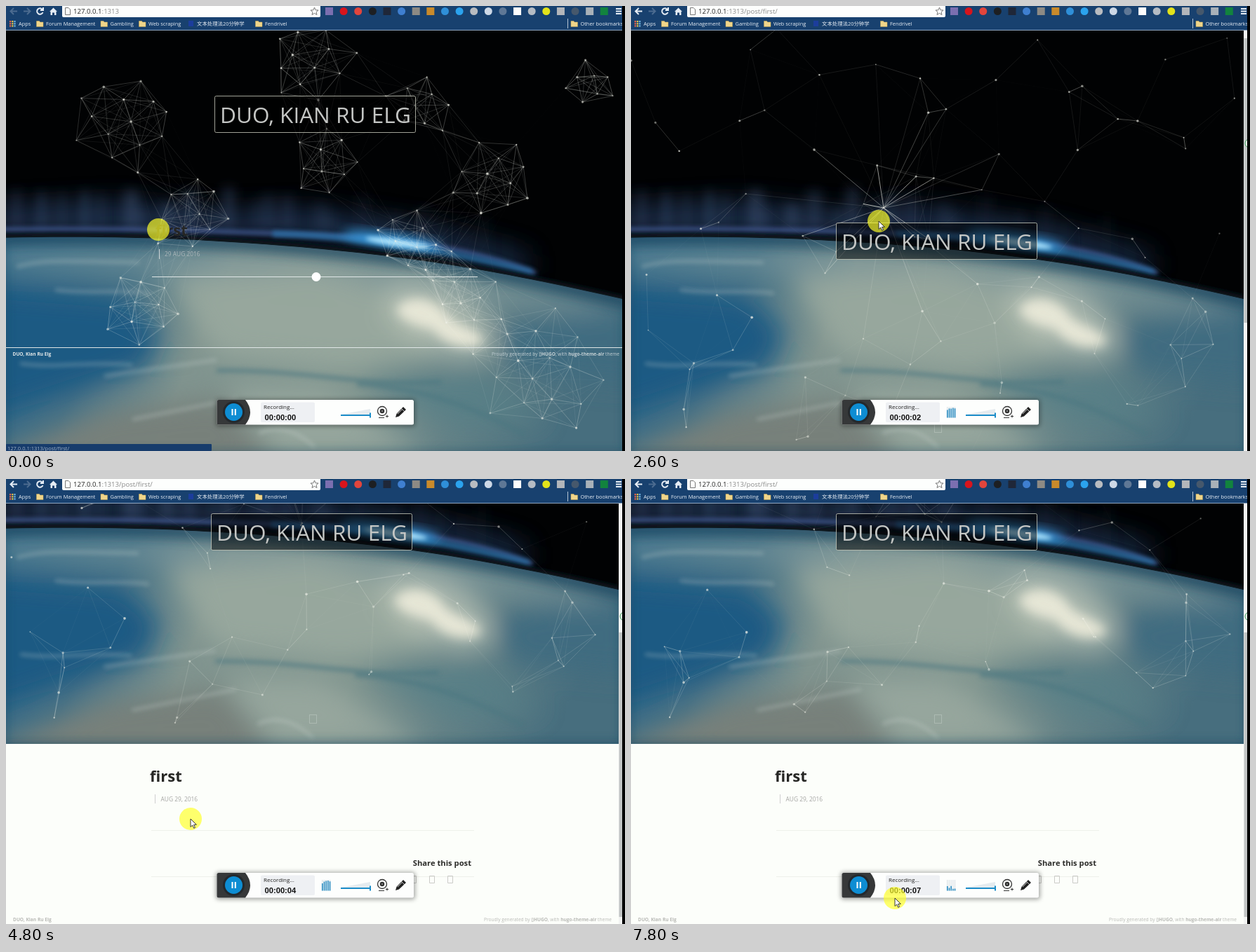
An HTML page with a canvas that plays this animation: 882x635 px, repeating every 8000 ms.

```html
<!DOCTYPE html>
<html lang="en">
<head>
<meta charset="utf-8">
<title>Air theme demo</title>
<style>
html, body { margin: 0; width: 100%; height: 100%; overflow: hidden; background: #000; }
#stage { position: relative; width: 882px; height: 635px; overflow: hidden; }
#stage > * { position: absolute; left: 0; top: 0; }
text { font-family: "Open Sans", "Noto Sans", sans-serif; }
.name { font-size: 31.5px; fill: #c4c6c4; }
.box { fill: #000; fill-opacity: .5; stroke: #c9cbbd; stroke-opacity: .8; }
.head { font-size: 22px; font-weight: 700; fill: #262624; }
.date { font-size: 8.4px; }
.foot { font-size: 6.6px; }
.b { font-weight: 700; }
.end { text-anchor: end; }
.mark { font-size: 7.4px; fill: #e9eff6; }
.url { font-size: 9.6px; fill: #8a8a8a; }
.arial { font-family: "Liberation Sans", Arial, sans-serif; }
</style>
</head>
<body>
<div id="stage">
<svg width="882" height="635">
  <defs>
    <filter id="soft" x="-50%" y="-50%" width="200%" height="200%"><feGaussianBlur stdDeviation="18"/></filter>
    <filter id="mid" x="-50%" y="-50%" width="200%" height="200%"><feGaussianBlur stdDeviation="8"/></filter>
    <filter id="fine" x="-20%" y="-50%" width="140%" height="200%"><feGaussianBlur stdDeviation="3"/></filter>
    <linearGradient id="land" x2="1" y2=".15">
      <stop offset="0" stop-color="#2a6587"/><stop offset=".22" stop-color="#437186"/>
      <stop offset=".38" stop-color="#80948f"/><stop offset=".65" stop-color="#80958f"/>
      <stop offset="1" stop-color="#476e7e"/>
    </linearGradient>
    <path id="globe" d="M-15 331C120 328 230 331 320 337C470 346 600 362 700 381C770 394 830 407 895 422V650H-15Z"/>
    <clipPath id="globeClip"><use href="#globe"/></clipPath>
  </defs>
  <g id="earth">
    <rect width="882" height="650" fill="#010203"/>
    <path d="M-20 290L160 280L300 295L430 290L600 315L745 355V385L600 350L400 328L-20 322Z" fill="#243a60" opacity=".75" filter="url(#soft)"/>
    <g id="rays" fill="#4a6288" filter="url(#mid)"/>
    <path d="M-10 319C200 317 350 322 480 329S700 358 755 382" fill="none" stroke="#4a62a0" stroke-width="6" opacity=".8" filter="url(#fine)"/>
    <path d="M380 325C470 326 590 340 750 380" fill="none" stroke="#2c78b0" stroke-width="9" opacity=".7" filter="url(#fine)"/>
    <ellipse cx="550" cy="335" rx="72" ry="9" transform="rotate(8 550 335)" fill="#38a0e6" filter="url(#mid)"/>
    <ellipse cx="558" cy="338" rx="46" ry="4.500" transform="rotate(8 558 338)" fill="#b4e8ff" filter="url(#fine)"/>
    <use href="#globe" y="-5" fill="#08121d" filter="url(#fine)"/>
    <g clip-path="url(#globeClip)">
      <use href="#globe" fill="url(#land)"/>
      <g filter="url(#soft)">
        <path d="M-20 340L330 345L620 375L900 435V450L600 410L200 382L-20 372Z" fill="#7f9a9f" opacity=".6"/>
        <path d="M-30 400L170 415L220 465L200 515L-30 590Z" fill="#1d5a83"/>
        <path d="M-30 645L140 578L310 560L390 660H-30Z" fill="#77807a"/>
        <path d="M230 390L440 375L560 410L610 500L480 520L300 500Z" fill="#9aa99f" opacity=".9"/>
        <path d="M690 455L900 430V540L730 525Z" fill="#416c80"/>
        <path d="M500 530L680 525L770 590L640 600Z" fill="#557f88" opacity=".8"/>
        <path d="M310 545L450 545L600 640H390Z" fill="#9caaa0" opacity=".8"/>
        <ellipse cx="620" cy="450" rx="85" ry="42" transform="rotate(25 620 450)" fill="#c3cabd" opacity=".7"/>
      </g>
      <path d="M556 432C570 412 610 410 632 446C660 462 690 470 676 484C645 492 620 478 608 462C590 458 560 450 556 432Z" fill="#e6e6d6" filter="url(#mid)"/>
      <g fill="none" stroke="#cfd8d3" stroke-width="4" opacity=".35" filter="url(#fine)">
        <path d="M15 372C60 360 90 365 190 366M70 405C120 412 160 404 205 410M20 510C70 518 120 506 180 512M140 528L300 505M180 590L330 560M360 610C390 595 420 610 440 630"/>
      </g>
      <path d="M300 520C420 518 520 545 620 536M500 540C600 545 670 575 740 612" fill="none" stroke="#4a7680" stroke-width="6" opacity=".6" filter="url(#fine)"/>
      <use href="#globe" fill="none" stroke="#1c4661" stroke-width="24" opacity=".75" filter="url(#mid)"/>
    </g>
  </g>
</svg>
<canvas width="882" height="635"></canvas>
<svg width="882" height="635">
  <g id="home">
    <rect class="box" x="297.5" y="128.5" width="286" height="52" rx="2"/>
    <text class="name" x="305" y="167">DUO, KIAN RU ELG</text>
    <text class="head" x="213" y="328">first</text>
    <path d="M218.5 347V361" stroke="#ccd3d6"/>
    <text class="date" x="226" y="357" fill="#aeb8bb">29 AUG 2016</text>
    <path d="M208 386.5H672M0 487.5H878" stroke="#dfe6e6"/>
    <circle cx="442" cy="386.5" r="6.5" fill="#fff"/>
    <g class="foot" fill="#c3cfd3">
      <text class="b" x="9.5" y="499" fill="#e3e8e8">DUO, Kian Ru Elg</text>
      <text class="end" x="874" y="499">Proudly generated by <tspan class="b">▯HUGO</tspan>, with <tspan class="b">hugo-theme-air</tspan> theme</text>
    </g>
    <rect y="625" width="293" height="10" rx="1" fill="#173c6c"/>
    <text x="2" y="633.5" font-size="7.5" fill="#9eb0c6">127.0.0.1:1313/post/first/</text>
  </g>
  <g id="post">
    <g id="sheet">
      <rect class="box" x="292.5" y="309.5" width="286" height="52" rx="2"/>
      <text class="name" x="300" y="348">DUO, KIAN RU ELG</text>
      <rect x="432.5" y="596.5" width="10" height="12" fill="none" stroke="#c8d2cc" opacity=".45"/>
      <rect y="638" width="873" height="262" fill="#fcfefa"/>
      <rect id="picked" x="205" y="668" width="44" height="32" fill="#cde5f7"/>
      <text class="head" x="205" y="692">first</text>
      <path d="M212.5 710V723" stroke="#cfcfcf"/>
      <text class="date" x="220.5" y="719.5" fill="#a5a5a3">AUG 29, 2016</text>
      <path d="M207 761.5H667M207 827.5H667" stroke="#eef1ea"/>
      <text class="b end" x="663" y="812" font-size="11.2" fill="#2c2c2a">Share this post</text>
      <path d="M577.5 826.5h7v10h-7zm26 0h7v10h-7zm26 0h7v10h-7z" fill="none" stroke="#cbcbc8"/>
      <g class="foot" fill="#b9bab6">
        <text class="b" x="10" y="891">DUO, Kian Ru Elg</text>
        <text class="end" x="863" y="891">Proudly generated by <tspan class="b">▯HUGO</tspan>, with <tspan class="b">hugo-theme-air</tspan> theme</text>
      </g>
    </g>
    <rect x="873" y="35" width="5" height="600" fill="#f3f4f3"/>
    <rect id="thumb" x="873.5" width="4.5" height="406" fill="#c2c5c5"/>
    <circle cx="881" cy="196" r="6" fill="#e8f4ea" stroke="#3b9a57"/>
  </g>
  <g id="chrome">
    <rect width="878" height="35" fill="#18416f"/>
    <path d="M0 34.5H878" stroke="#8ea5bf"/>
    <rect x="80" y="-3" width="368" height="19" rx="2" fill="#fdfefd"/>
    <g fill="none" stroke="#e6edf5" stroke-width="2">
      <path id="back" d="M16 7.5H7M11 3L6.5 7.5L11 12"/>
      <path d="M25 7.5H34M30 3L34.5 7.5L30 12" opacity=".25"/>
      <path d="M52 5A4.3 4.3 0 1 0 52.5 9M53 2V6H49"/>
    </g>
    <path d="M62 8L67.5 2.5L73 8H71.5V13H69V9.5H66V13H63.5V8Z" fill="#e6edf5"/>
    <path d="M84.5 2.5H89L91.5 5V12.5H84.5Z" fill="none" stroke="#777"/>
    <text class="url" x="96" y="11"><tspan fill="#222">127.0.0.1</tspan>:1313<tspan id="path">/post/first/</tspan></text>
    <path d="M439.5 2L441.1 5.8L445 6L442 8.7L443 12.5L439.5 10.4L436 12.5L437 8.7L434 6L437.9 5.8Z" fill="none" stroke="#777"/>
    <path d="M869 4H877M869 7.5H877M869 11H877" stroke="#e6edf5" stroke-width="1.8"/>
    <path d="M800.5 18V32" stroke="#b5c4d5"/>
    <text class="mark" x="18" y="28">Apps</text>
    <rect x="260" y="21" width="7" height="8" fill="#1c3d9c"/>
    <text class="mark" x="272" y="28">文本处理法20分钟学</text>
  </g>
  <rect x="878" width="4" height="635" fill="#000"/>
  <g id="recorder">
    <rect x="299" y="561" width="284" height="39" rx="4" fill="#000" opacity=".35" filter="url(#fine)"/>
    <rect x="300.5" y="562" width="280.5" height="35.5" rx="2.5" fill="#fdfefd"/>
    <path d="M303 562H341Q355 579.5 341 597.5H303Q300.5 597.5 300.5 595V564.5Q300.5 562 303 562Z" fill="#363839"/>
    <circle cx="324.5" cy="579.5" r="15.5" fill="#24292d"/>
    <circle cx="324.5" cy="579.5" r="12.5" fill="#0e8dd3"/>
    <path d="M322.5 575V584M326.8 575V584" stroke="#fff" stroke-width="2"/>
    <rect x="363" y="565.5" width="77" height="28.5" rx="2" fill="#eef0f3"/>
    <text x="367" y="574.5" font-size="8" fill="#222">Recording...</text>
    <text id="clock" class="arial b" x="368.5" y="590.5" font-size="11.2" fill="#111"></text>
    <g id="bars"></g>
    <path d="M477 583L519 575V583Z" fill="#e5ebef"/>
    <path d="M477 584H520M519 580.5V587.5" stroke="#1b8cc8" stroke-width="2"/>
    <g fill="none" stroke="#333">
      <circle cx="536" cy="578" r="6.5" stroke-width="1.3"/><circle cx="536" cy="578" r="2" stroke-width="2.5"/>
      <path d="M531 587.5H539M541 585.5H545M543 583.5V587.5"/>
    </g>
    <path d="M555 587L556.5 582L566 572L570 576L560 585.5Z" fill="#222"/>
    <path d="M563 574L568 579M558 582L565 575" stroke="#eee" stroke-width=".8"/>
  </g>
  <g id="pointer">
    <circle r="16" fill="#ffff28" opacity=".68"/>
    <path id="arrow" d="M0 0V11.5L2.7 9L4.7 13.3L6.5 12.4L4.6 8.3H8.3Z" fill="#fff" stroke="#222" stroke-width=".9"/>
    <path id="hand" d="M2 1Q3.5-1 4.7 1V6L10 7.5V11L8.5 15H3L0 10Q-1.5 7 2 8.5Z" fill="#fff" stroke="#222" stroke-width=".9"/>
  </g>
</svg>
</div>
<script>
const LOOP = 8000, STEP = 200, OPEN_POST = 1400, LINK = 112, GRAB = 225, SCROLL = 260;
const $ = id => document.getElementById(id);
const ctx = document.querySelector('canvas').getContext('2d');
const rand = n => { const s = Math.sin(n * 127.1 + 3) * 43758.5453; return s - Math.floor(s); };
const spread = n => rand(n) - .5;
const ease = x => { x = Math.min(1, Math.max(0, x)); return x * x * (3 - 2 * x); };
const show = (id, on) => { $(id).style.display = on ? '' : 'none'; };

function add(parent, tag, attrs, label = '') {
  const el = document.createElementNS($('home').namespaceURI, tag);
  for (const key in attrs) el.setAttribute(key, attrs[key]);
  el.textContent = label;
  $(parent).appendChild(el);
  return el;
}

const dot = (x, y, seed) => ({ x, y, vx: spread(seed + 500) * 15, vy: spread(seed + 900) * 15 });

// A spiral of dots: the wider the knot, the more dots
function knot([x, y, radius], k) {
  const count = Math.round(radius / 5.5);
  return Array.from({ length: count }, (_, i) => {
    const angle = i * 2.4 + k, r = radius * Math.sqrt((i + .5) / count) * (.85 + .3 * rand(i + k * 20));
    return dot(x + r * Math.cos(angle), y + r * Math.sin(angle), i + k * 20);
  });
}

const homeNet = [[165, 165, 76], [432, 76, 64], [455, 225, 55], [595, 140, 50], [695, 250, 64], [835, 110, 42],
  [265, 300, 60], [575, 335, 55], [650, 410, 60], [765, 525, 92], [195, 430, 60]].flatMap(knot);

// A loose grid over the whole header
const postNet = Array.from({ length: 80 }, (_, i) =>
  dot((i % 10 + .5 + spread(i) * 1.1) * 87, 35 + (Math.floor(i / 10) + .5 + spread(i + 200) * 1.1) * 75, i));

// Time, x, y
const mousePath = [[0, 217, 319], [800, 237, 325], [1400, 238, 326], [2600, 353, 307], [3800, 471, 326],
  [4800, 263, 485], [6000, 256, 428], [7800, 376, 598]];

function along(path, t) {
  let i = 0;
  while (i < path.length - 2 && t >= path[i + 1][0]) i++;
  const [a, b] = [path[i], path[i + 1]], p = ease((t - a[0]) / (b[0] - a[0]));
  return { x: a[1] + (b[1] - a[1]) * p, y: a[2] + (b[2] - a[2]) * p };
}

function line(a, b, alpha) {
  ctx.globalAlpha = alpha;
  ctx.beginPath();
  ctx.moveTo(a.x, a.y);
  ctx.lineTo(b.x, b.y);
  ctx.stroke();
}

function drawNet(net, t, scroll, grab) {
  ctx.clearRect(0, 0, 882, 635);
  ctx.fillStyle = ctx.strokeStyle = '#f2f3ea';
  ctx.lineWidth = .9;
  const dots = net.map(d => ({ x: d.x + d.vx * t / 1000, y: d.y + d.vy * t / 1000 - scroll }));
  dots.forEach((a, i) => {
    for (const b of dots.slice(i + 1)) {
      const d = Math.hypot(a.x - b.x, a.y - b.y);
      if (d < LINK) line(a, b, .42 * (1 - d / LINK));
    }
    if (grab) {
      const d = Math.hypot(a.x - grab.x, a.y - grab.y);
      if (d < GRAB) line(a, grab, .95 * (1 - d / GRAB));
    }
    ctx.globalAlpha = .35 + .4 * rand(i + 40);
    ctx.beginPath();
    ctx.arc(a.x, a.y, .8 + 1.1 * rand(i + 70), 0, 7);
    ctx.fill();
  });
}

// Toolbar marks: c for a circle, s for a square
('s#7b6fb0 c#d8141c c#e2453c c#1d1f22 s#1f2738 c#3f7fd0 s#8d8a84 s#c98a2b c#2f8fd8 c#2ba3ee c#b9bcc0 c#cdd8e6 ' +
 'c#5f7896 s#fdfdfd c#b5bcc4 c#e3e31a s#b3b6ba c#46586c s#a9b1b8 s#12833e').split(' ').forEach((m, i) => {
  const x = 460.5 + i * 20.62, fill = m.slice(1);
  if (m[0] === 'c') add('chrome', 'circle', { cx: x, cy: 7.5, r: 5.5, fill });
  else add('chrome', 'rect', { x: x - 5.5, y: 2, width: 11, height: 11, fill });
});

const bookmarks = { 'Forum Management': 57, 'Gambling': 148.5, 'Web scraping': 203, 'Fendrivel': 369, 'Other bookmarks': 818.5 };
for (const [label, x] of Object.entries(bookmarks)) {
  add('chrome', 'path', { d: `M${x - 13.5} 21.5h4l1 1.5h4.5v6.5h-9.5z`, fill: '#f0d58a', stroke: '#c9a850', 'stroke-width': .5 });
  add('chrome', 'text', { class: 'mark', x, y: 28 }, label);
}
for (let i = 0; i < 9; i++)
  add('chrome', 'rect', { x: 5 + i % 3 * 3.2, y: 21 + (i / 3 | 0) * 3.2, width: 2.2, height: 2.2,
    fill: ['#e8604c', '#e9c84a', '#6fb7e6'][i % 3] });

// Polar light rays, weaker to the right
for (let i = 0; i < 24; i++) {
  const x = i * 30 + rand(i) * 20, h = 25 + rand(i + 20) * 35;
  add('rays', 'rect', { x, y: 318 - h + Math.max(0, x - 350) ** 2 / 2700, width: 6 + rand(i + 9) * 16, height: h,
    opacity: (.15 + .4 * rand(i + 50)) * (1 - x / 850) });
}

const bars = Array.from({ length: 5 }, (_, i) => {
  const x = 450 + i * 2.7;
  add('bars', 'rect', { x, y: 572, width: 1.4, height: 15.5, fill: '#dfe5e9' });
  return add('bars', 'rect', { x, width: 1.5, fill: '#1b84bd' });
});

function render(time) {
  const t = Math.floor(time / STEP) * STEP;
  const post = t >= OPEN_POST;
  const scroll = post ? SCROLL * ease((t - 3755) / 800) : 0;
  const mouse = along(mousePath, t);
  const grab = post && t <= 4000 && { x: mouse.x + 7, y: mouse.y - 19 };

  show('home', !post);
  show('post', post);
  show('path', post);
  show('picked', t >= 5600 && t < 6600);
  $('back').style.opacity = post ? 1 : .25;
  $('earth').setAttribute('transform', post ? `translate(0 ${-scroll}) scale(.9943 1)` : '');
  $('sheet').setAttribute('transform', `translate(0 ${-scroll})`);
  $('thumb').setAttribute('y', 46 + scroll * .665);
  drawNet(post ? postNet : homeNet, t, scroll, grab);

  $('clock').textContent = '00:00:0' + Math.max(0, Math.floor((t - 150) / 1000));
  show('bars', t >= 400);
  bars.forEach((bar, i) => {
    const r = rand(t / STEP * 7 + i), h = t >= 7600 ? 2 + r * 5 : 10 + i * .8 + r * 2.5;
    bar.setAttribute('y', 587.5 - h);
    bar.setAttribute('height', h);
  });

  $('pointer').setAttribute('transform', `translate(${mouse.x} ${mouse.y})`);
  show('hand', t >= 400 && !post);
  show('arrow', post && t < 3400 || t >= 4200 && t < 5200 || t >= 6600);
}

const start = performance.now();
(function tick() {
  render((performance.now() - start) % LOOP);
  requestAnimationFrame(tick);
})();
</script>
</body>
</html>
```
